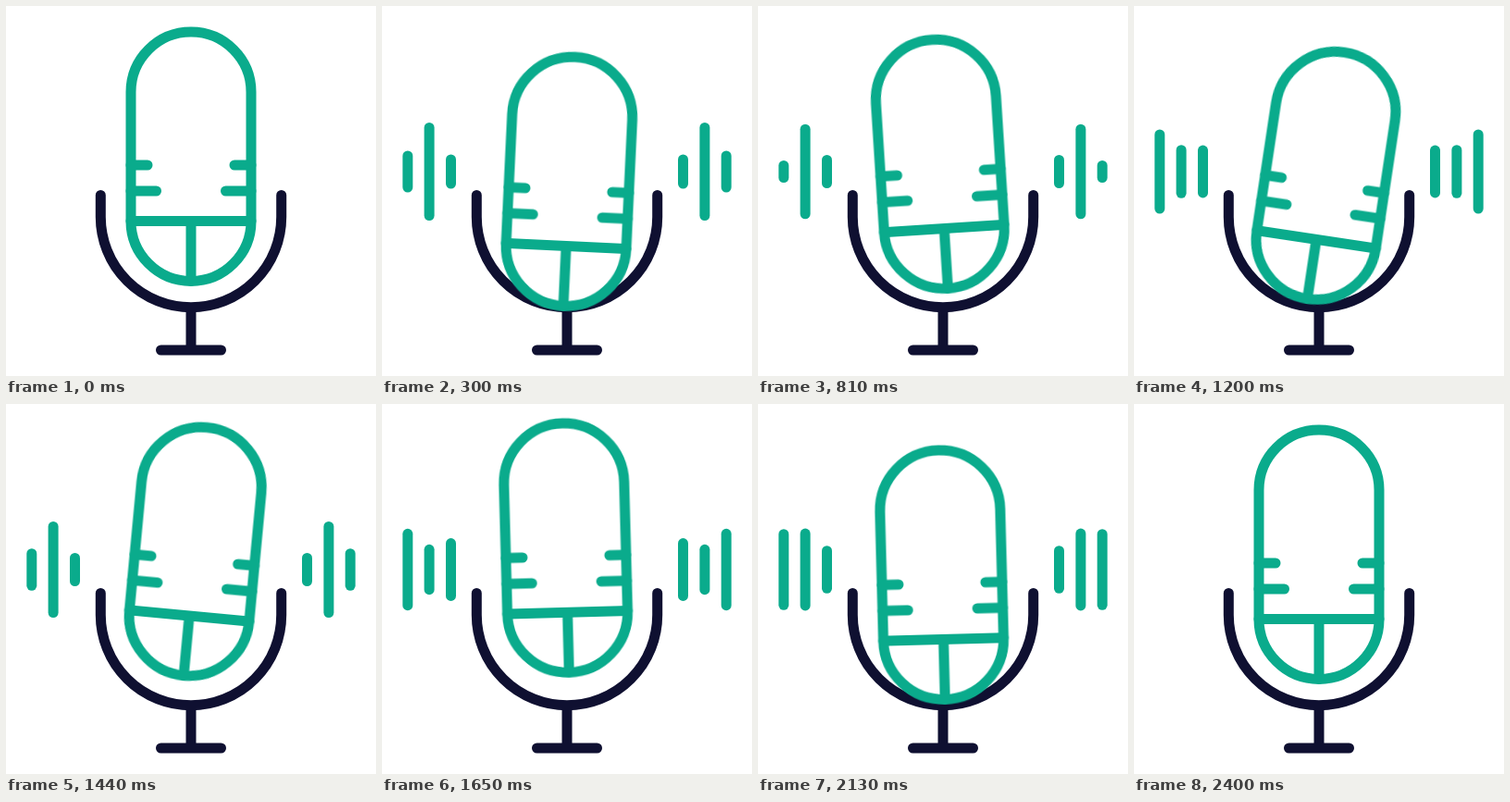
An HTML page for the animation above (2.43 s loop, 400x400 px).

```html
<!DOCTYPE html>
<html lang="en">
<head>
<meta charset="utf-8">
<title>Microphone</title>
<style>
  html, body { margin: 0; width: 100%; height: 100%; overflow: hidden; background: #fff; }
  svg { display: block; width: 100%; height: 100%; }

  .line { fill: none; stroke-width: 11; stroke-linecap: round; }
  .stand { stroke: #0f1031; }
  .mic { stroke: #0aab8c; }

  .drop, .tilt, .bar {
    animation: 2430ms cubic-bezier(.37, 0, .63, 1) infinite;
  }
  .drop { animation-name: drop; }
  .tilt { animation-name: tilt; transform-origin: 200px 213px; }

  .bar {
    width: 11px;
    height: 0;
    rx: 5.5px;
    fill: #0aab8c;
    transform-box: fill-box;
    transform: translateY(-50%);
  }
  .outer { animation-name: outer; }
  .middle { animation-name: middle; }
  .inner { animation-name: inner; }

  @keyframes drop {
    0%, 98.77%, 100% { transform: translateY(0); }
    12.35% { transform: translateY(27px); }
    26.5% { transform: translateY(-6.5px); }
    42% { transform: translateY(29px); }
    64.8% { transform: translateY(-8.5px); }
    88.3% { transform: translateY(22px); }
  }
  @keyframes tilt {
    0%, 98.77%, 100% { transform: rotate(0deg); }
    12.35% { transform: rotate(2.7deg); }
    30.9% { transform: rotate(-4.1deg); }
    51.2% { transform: rotate(8.8deg); }
    74.1% { transform: rotate(-3.6deg); }
  }
  @keyframes outer {
    0%, 98.77%, 100% { height: 0; }
    12.35% { height: 45px; }
    22.2% { height: 90px; }
    33.33% { height: 24px; }
    49.38% { height: 91px; }
    60% { height: 45px; }
    69.1% { height: 90px; }
    76.54% { height: 46px; }
    86.4% { height: 90px; }
  }
  @keyframes middle {
    0%, 98.77%, 100% { height: 0; }
    12.35% { height: 106px; }
    22.2% { height: 44px; }
    34.6% { height: 104px; }
    48.1% { height: 56px; }
    59.26% { height: 104px; }
    70.4% { height: 48px; }
    84% { height: 104px; }
  }
  @keyframes inner {
    0%, 98.77%, 100% { height: 0; }
    12.35% { height: 37px; }
    23.5% { height: 104px; }
    33.33% { height: 36px; }
    42% { height: 78px; }
    56.8%, 60% { height: 36px; }
    76.54% { height: 104px; }
  }
</style>
</head>
<body>
<svg viewBox="0 0 400 400">
  <path class="line stand" d="M102.3 204.5V228a97.7 97.7 0 0 0 195.4 0V204.5M200 326V372M167.5 372H232.5"/>
  <g class="drop">
    <g class="tilt line mic">
      <rect x="135" y="28" width="130" height="269.5" rx="65"/>
      <path d="M135 172H153M135 200H162.5M265 172H247M265 200H237.5M135 232.5H265M200 232.5V297"/>
    </g>
  </g>
  <rect class="bar outer" x="22.3" y="179"/>
  <rect class="bar middle" x="45.6" y="179"/>
  <rect class="bar inner" x="69" y="179"/>
  <rect class="bar inner" x="320" y="179"/>
  <rect class="bar middle" x="343.4" y="179"/>
  <rect class="bar outer" x="366.7" y="179"/>
</svg>
</body>
</html>
```
